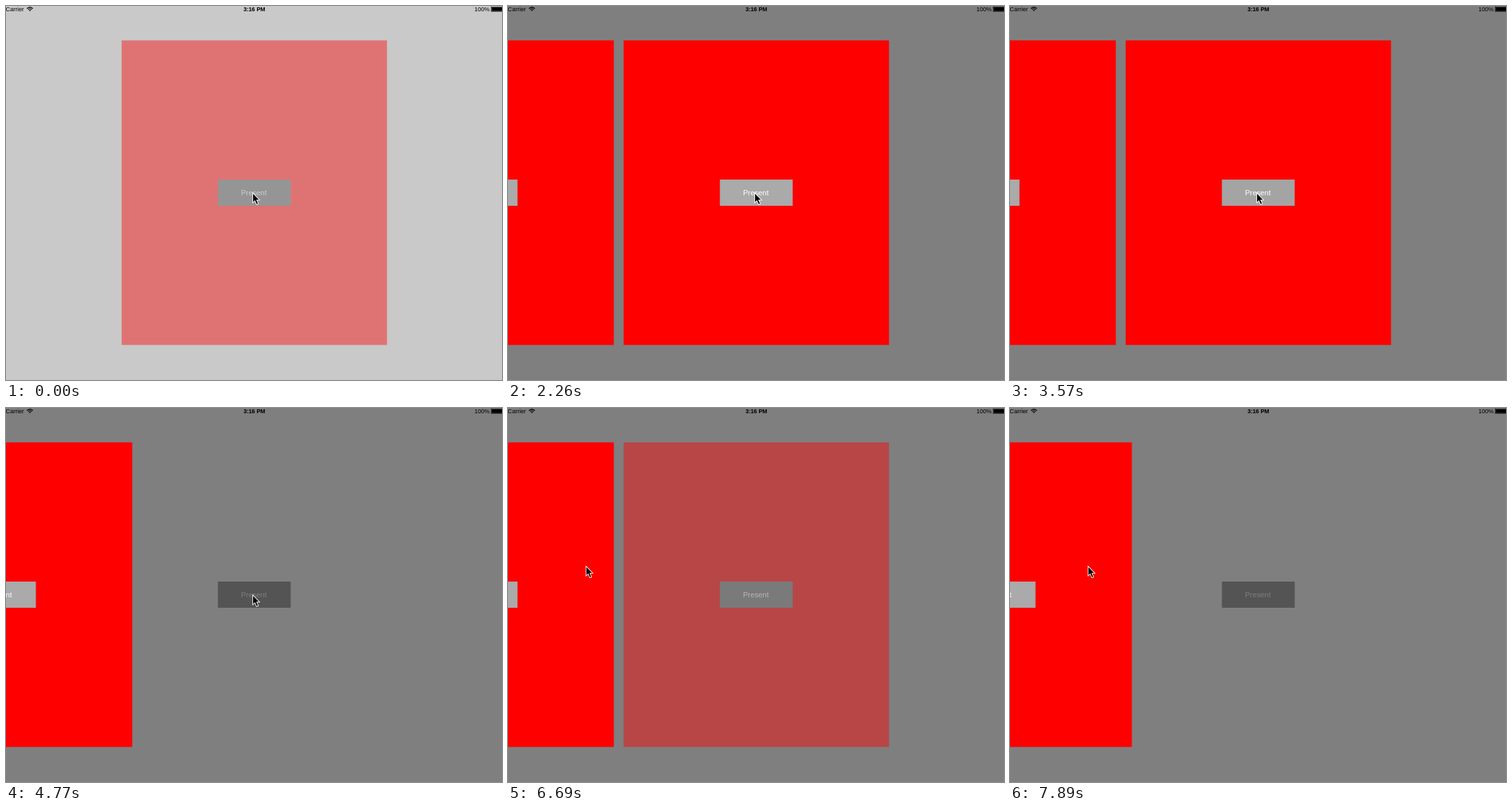
An HTML page with a canvas that plays this animation: 757 px wide and 571 px high, repeating every 8000 ms.

```html
<!DOCTYPE html>
<html lang="en">
<head>
<meta charset="utf-8">
<title>Stacked sheets</title>
<style>
  html, body { margin: 0; width: 100%; height: 100%; overflow: hidden; background: #fff; }
  canvas { display: block; }
</style>
</head>
<body>
<canvas id="stage" width="757" height="571"></canvas>
<script>
const W = 757, H = 571, LOOP = 8000;
const SHIFT = 420, MOVE = 300, FADE_OUT = 130;
const FONT = '"Liberation Sans", Arial, sans-serif';
const ctx = document.getElementById('stage').getContext('2d');
const layer = Object.assign(document.createElement('canvas'), { width: W, height: H });
const sheetCtx = layer.getContext('2d');

// The screen refreshes only in these bursts: start, end, count.
const bursts = [[0, 0, 1], [120, 230, 2], [1550, 2260, 7], [2980, 3570, 6], [4530, 5130, 6],
  [5370, 5610, 3], [6690, 7050, 4], [7770, 7890, 2]];
const ticks = bursts.flatMap(([from, to, n]) =>
  Array.from({ length: n }, (_, i) => Math.min(from + i * 120, to)));

const moves = [
  { at: 1640, show: true, press: [1540, 1780], shade: 170 },
  { at: 2965, show: true, press: [2970, 3100], shade: 164 },
  { at: 4520, show: true, press: [4525, 4640], shade: 170 },
  { at: 6750, show: false, shade: 170 },
  { at: 7846, show: false, shade: 170 }
];

function ease(x) {
  x = Math.max(0, Math.min(1, x));
  return x * x * (3 - 2 * x);
}

function rect(c, x, y, w, h, color) {
  c.fillStyle = color;
  c.fillRect(x, y, w, h);
}

function text(c, str, x, y, size, color, align = 'left', weight = '') {
  c.font = `${weight} ${size}px ${FONT}`;
  c.textAlign = align;
  c.fillStyle = color;
  c.fillText(str, x, y);
}

function button(c, shade, textAlpha) {
  rect(c, 323.4, 265, 111.1, 40, `rgb(${shade},${shade},${shade})`);
  text(c, 'Present', 378.3, 289, 11.3, `rgba(255,255,255,${textAlpha})`, 'center');
}

function sheet(x, alpha = 1, shade = 170, textAlpha = 1) {
  if (alpha <= 0) return;
  sheetCtx.clearRect(0, 0, W, H);
  rect(sheetCtx, 176.5, 52.5, 405, 465, '#f00');
  button(sheetCtx, shade, textAlpha);
  ctx.globalAlpha = alpha;
  ctx.drawImage(layer, x, 0);
  ctx.globalAlpha = 1;
}

function statusBar() {
  text(ctx, 'Carrier', -0.4, 8, 9.1, '#000');
  text(ctx, '3:16 PM', 379, 8, 8.8, '#000', 'center', 'bold');
  text(ctx, '100%', 715, 8, 9, '#000');

  ctx.strokeStyle = '#000';
  ctx.lineWidth = 1.3;
  for (const r of [3.6, 6]) {
    ctx.beginPath();
    ctx.arc(36.5, 8, r, -Math.PI * 0.77, -Math.PI * 0.23);
    ctx.stroke();
  }
  ctx.fillStyle = '#000';
  ctx.beginPath();
  ctx.moveTo(36.5, 8);
  ctx.arc(36.5, 8, 2, -Math.PI * 0.77, -Math.PI * 0.23);
  ctx.fill();

  ctx.lineWidth = 0.6;
  ctx.strokeRect(740.5, 1.4, 18, 7);
  rect(ctx, 741.3, 2.1, 17, 5.6, '#000');
}

function cursor(t) {
  const k = ease((t - 5290) / 310);
  ctx.save();
  ctx.translate(376.5 - 257.5 * k, 285 - 44 * k);
  ctx.beginPath();
  [[0.6, 1.7], [0.6, 14.2], [3.5, 11.4], [6.2, 17.5], [8, 16.7], [5.4, 10.8], [9.4, 10.8]]
    .forEach(([x, y]) => ctx.lineTo(x, y));
  ctx.closePath();
  ctx.strokeStyle = '#fff';
  ctx.lineWidth = 2;
  ctx.stroke();
  ctx.fillStyle = '#000';
  ctx.fill();
  ctx.restore();
}

function sheets(t) {
  const step = moves.filter(m => t >= Math.min(m.at, m.press ? m.press[0] : m.at - FADE_OUT)).pop();
  if (!step) return sheet(0, ease((t + 135) / 300));

  const { at, show, press, shade } = step;
  const slide = ease((t - at) / MOVE);
  const away = show ? slide : 1 - slide;
  const alpha = show ? ease((t - at - MOVE) / MOVE) : 1 - ease((t - at + FADE_OUT) / FADE_OUT);
  const pressed = press && t >= press[0] && t < press[1];

  if (step !== moves[0]) sheet(-SHIFT * (1 + away));
  sheet(-SHIFT * away, 1, 170, pressed ? 0.2 : 1);
  sheet(0, alpha, shade);
}

function draw(t) {
  rect(ctx, 0, 0, W, H, '#fff');
  button(ctx, 170, t < 230 ? 0.5 : 1);
  rect(ctx, 0, 0, W, H, `rgba(0,0,0,${0.502 * ease((t + 135) / 300)})`);
  statusBar();
  sheets(t);
  cursor(t);
}

const start = performance.now();
function frame() {
  const t = (performance.now() - start) % LOOP;
  draw(ticks.filter(tick => tick <= t).pop());
  requestAnimationFrame(frame);
}
frame();
</script>
</body>
</html>
```
